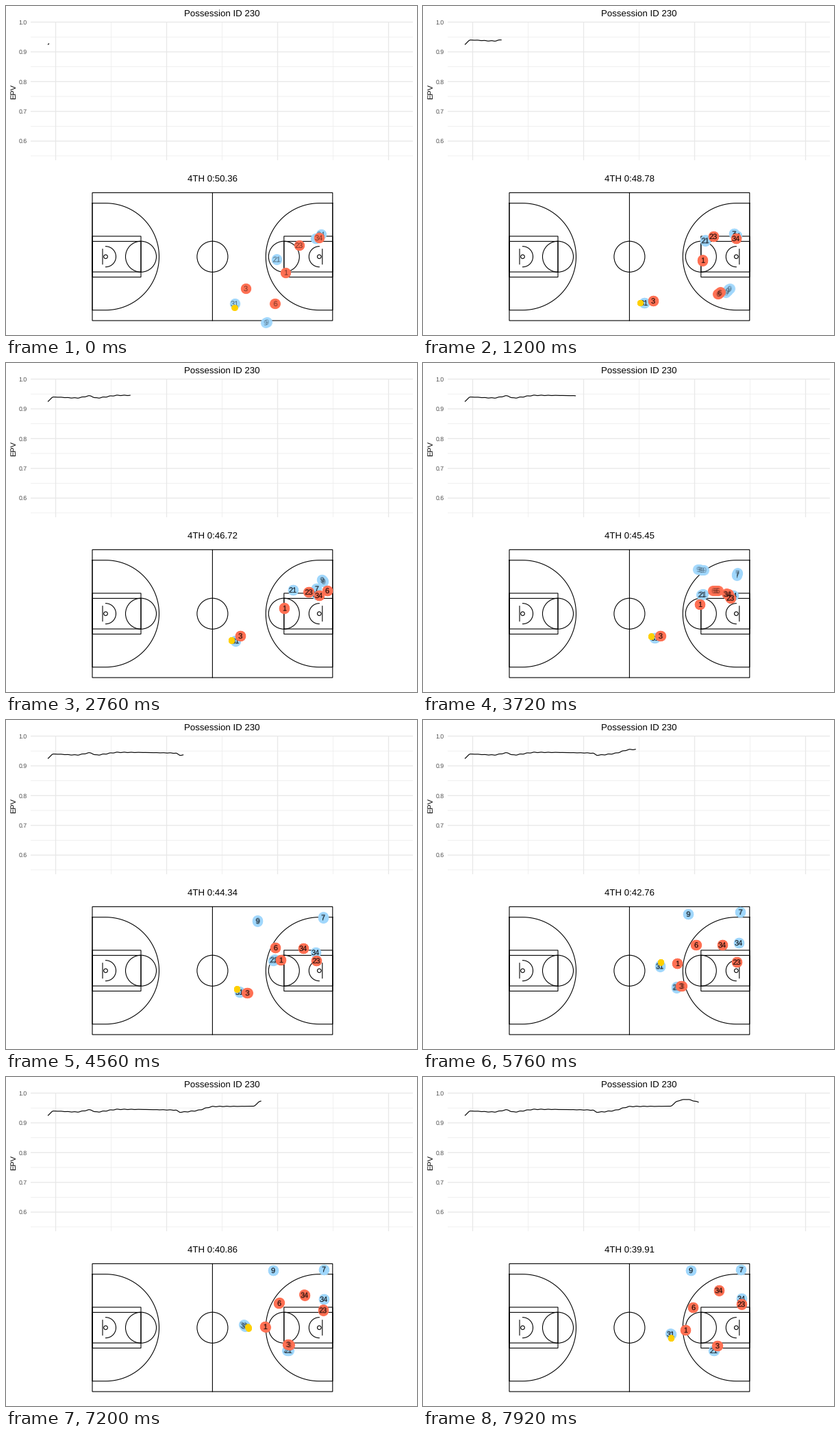
Write a matplotlib script that moves like this. It is 600 px wide and 480 px high and loops after 8000 ms.

```python
import numpy as np
import matplotlib.pyplot as plt
from matplotlib.animation import FuncAnimation
from matplotlib.patches import Circle, Rectangle

W, H, DPI = 600, 480, 100
PT = 72 / DPI                       # points per pixel
STEPS, TICK, HOLD = 66, 40, 3       # each step lasts HOLD ticks
TRAIL = np.linspace(-0.5, 0.5, 5)   # positions overlaid within one step

plt.rcParams.update({"font.family": "Liberation Sans",
                     "text.hinting": "none",
                     "path.snap": False})

fig = plt.figure(figsize=(W / DPI, H / DPI), dpi=DPI, facecolor="white")
ax = fig.add_axes([0, 0, 1, 1])
ax.set_xlim(0, W)
ax.set_ylim(H, 0)
ax.axis("off")


def smooth(t, knots, vals):
    """Cubic path through the knots that never overshoots them."""
    knots, vals = np.asarray(knots, float), np.asarray(vals, float)
    h = np.diff(knots)
    d = np.diff(vals) / h
    m = np.empty_like(vals)
    m[0], m[-1] = d[0], d[-1]
    a, b = d[:-1], d[1:]
    total = np.where(a + b == 0, 1, a + b)
    m[1:-1] = np.where(a * b > 0, 2 * a * b / total, 0)
    i = np.clip(np.searchsorted(knots, t, side="right") - 1, 0, len(h) - 1)
    u = (t - knots[i]) / h[i]
    return ((1 + 2 * u) * (1 - u) ** 2 * vals[i]
            + u * (1 - u) ** 2 * h[i] * m[i]
            + u * u * (3 - 2 * u) * vals[i + 1]
            + u * u * (u - 1) * h[i] * m[i + 1])


def follow(*stops):
    """Motion through (step, x, y) stops, as a function of time."""
    k, x, y = zip(*stops)
    return lambda t: np.column_stack([smooth(t, k, x), smooth(t, k, y)])


def label(x, y, s, px, **kw):
    kw = {"ha": "center", "va": "baseline", "color": "black", **kw}
    return ax.text(x, y, s, fontsize=px * PT, **kw)


def stroke(xs, ys, px=1.1, color="black", **kw):
    return ax.plot(xs, ys, color=color, lw=px * PT, **kw)[0]


# ---- chart ----
def value_y(v):
    return 23.5 + (1 - v) * 434


def grid(top_value, left, px, color):
    kw = dict(px=px, color=color, solid_capstyle="butt", zorder=0)
    for v in top_value - 0.1 * np.arange(5):
        stroke([36, 594], [value_y(v)] * 2, **kw)
    for x in np.arange(left, 594, 162):
        stroke([x, x], [23, 225], **kw)


grid(0.95, 153.5, 0.7, "#ebebeb")
grid(1.0, 72.5, 1.3, "#e8e8e8")
for v in 1 - 0.1 * np.arange(5):
    label(31, value_y(v) + 3.2, f"{v:.1f}", 8.8, ha="right", color="#4d4d4d")
label(14, 125, "EPV", 11, rotation=90, rotation_mode="anchor")
label(315, 15.3, "Possession ID 230", 13.2)
clock = label(301.5, 255.4, "", 13.2)
epv = stroke([], [], 1.15, zorder=2)


def epv_y(t):
    """Main turns of the curve plus a small ripple."""
    k = [0, 1.5, 8, 12, 13.4, 20, 36, 37.3, 42, 47, 58, 60, 62.5, 66]
    y = [56, 49.7, 51, 48, 51, 47.2, 48.3, 51.2, 49, 43, 42.6, 35.4, 32.7, 36.7]
    return smooth(t, k, y) + 0.45 * np.sin(np.pi * t) * np.sin(t / 9)


# ---- court ----
MID_X, MID_Y, HALF_W, HALF_H = 301.4, 365.7, 175.4, 93.3


def outline(patch):
    patch.set(fill=False, edgecolor="black", linewidth=1.1 * PT)
    ax.add_patch(patch)


def half_court(side):
    def fx(depth):
        return MID_X + side * (HALF_W - depth)

    def box(depth, half):
        outline(Rectangle((min(fx(0), fx(depth)), MID_Y - half),
                          depth, 2 * half))

    def bow(r):
        a = np.linspace(-np.pi / 2, np.pi / 2, 80)
        return fx(19.5 + r * np.cos(a)), MID_Y + r * np.sin(a)

    box(71, 29.8)
    box(71, 22.3)
    outline(Circle((fx(71), MID_Y), 22.5))
    outline(Circle((fx(19.5), MID_Y), 2.8))
    stroke([fx(15)] * 2, [MID_Y - 11, MID_Y + 11])
    stroke(*bow(15))
    x, y = bow(78)
    stroke(np.r_[fx(0), x, fx(0), fx(0)], np.r_[y[0], y, y[-1], y[0]])


outline(Rectangle((MID_X - HALF_W, MID_Y - HALF_H), 2 * HALF_W, 2 * HALF_H))
stroke([MID_X, MID_X], [MID_Y - HALF_H, MID_Y + HALF_H])
outline(Circle((MID_X, MID_Y), 22.5))
half_court(1)
half_court(-1)

# ---- players: a few stops each ----
handler = follow((0, 334, 434), (10, 323, 433), (23, 335, 405), (38, 341, 397),
                 (48, 346, 359), (54, 340, 355), (66, 362, 375))


def dribble(t):
    """The ball swings around its handler."""
    a = np.radians(smooth(t, [0, 10, 23, 48, 66], [90, 180, 185, 280, 450]))
    return handler(t) + 6 * np.column_stack([np.cos(a), np.sin(a)])


BLUE = {
    "34": follow((0, 460, 333), (38, 452, 339), (48, 461, 325), (66, 465, 323)),
    "7": follow((0, 452, 339), (10, 454, 332), (23, 453, 329), (38, 463, 288),
                (48, 463, 280), (66, 464, 281)),
    "21": follow((0, 395, 370), (10, 412, 342), (23, 419, 331), (38, 391, 350),
                 (48, 370, 390), (54, 396, 398), (66, 425, 399)),
    "31": handler,
    "9": follow((0, 379, 462), (10, 445, 415), (16, 472, 368), (23, 462, 317),
                (38, 367, 293), (48, 387, 283), (66, 391, 282)),
}
RED = {
    "23": follow((0, 428, 349), (10, 424, 336), (23, 442, 334), (38, 453, 351),
                 (48, 458, 353), (66, 465, 331)),
    "34": follow((0, 457, 338), (23, 457, 339), (38, 434, 333), (54, 438, 324),
                 (66, 432, 311)),
    "1": follow((0, 408, 389), (10, 408, 371), (38, 401, 350), (48, 371, 355),
                (66, 383, 369)),
    "3": follow((0, 350, 412), (10, 336, 430), (23, 342, 398), (38, 352, 398),
                (48, 377, 388), (66, 430, 392)),
    "6": follow((0, 392, 434), (10, 432, 419), (23, 469, 332), (38, 393, 332),
                (54, 401, 326), (66, 394, 336)),
}


class Team:
    def __init__(self, paths, color, r, z):
        self.paths = paths
        self.dots = ax.scatter([], [], s=(2 * r * PT) ** 2, c=color,
                               alpha=0.9, linewidths=0, zorder=z)
        self.tags = {n: [label(0, 0, n, 11, alpha=0.3, zorder=z + 1)
                         for _ in TRAIL] for n in paths if n}

    def place(self, times):
        spots = {name: path(times) for name, path in self.paths.items()}
        self.dots.set_offsets(np.concatenate(list(spots.values())))
        for name, tags in self.tags.items():
            for i, tag in enumerate(tags):
                tag.set_visible(i < len(times))
                if i < len(times):
                    x, y = spots[name][i]
                    tag.set_position((x, y + 3.9))


teams = [Team(BLUE, "#a0d7fc", 7.6, 3),
         Team(RED, "#ff7053", 7.6, 5),
         Team({"": dribble}, "#ffd000", 4.5, 7)]


def update(i):
    k = i // HOLD
    clock.set_text(f"4TH 0:{50.36 - 10.45 * k / STEPS:.2f}")
    t = np.linspace(0, min(k + 0.2, STEPS), 6 * k + 2)
    epv.set_data(61.5 + 5.159 * t, epv_y(t))
    times = k + TRAIL
    times = times[times >= 0][:2] if k == 0 else np.minimum(times, STEPS)
    for team in teams:
        team.place(times)
    return []


anim = FuncAnimation(fig, update, frames=200, interval=TICK,
                     repeat=True, repeat_delay=0, blit=False)
plt.show()
```
